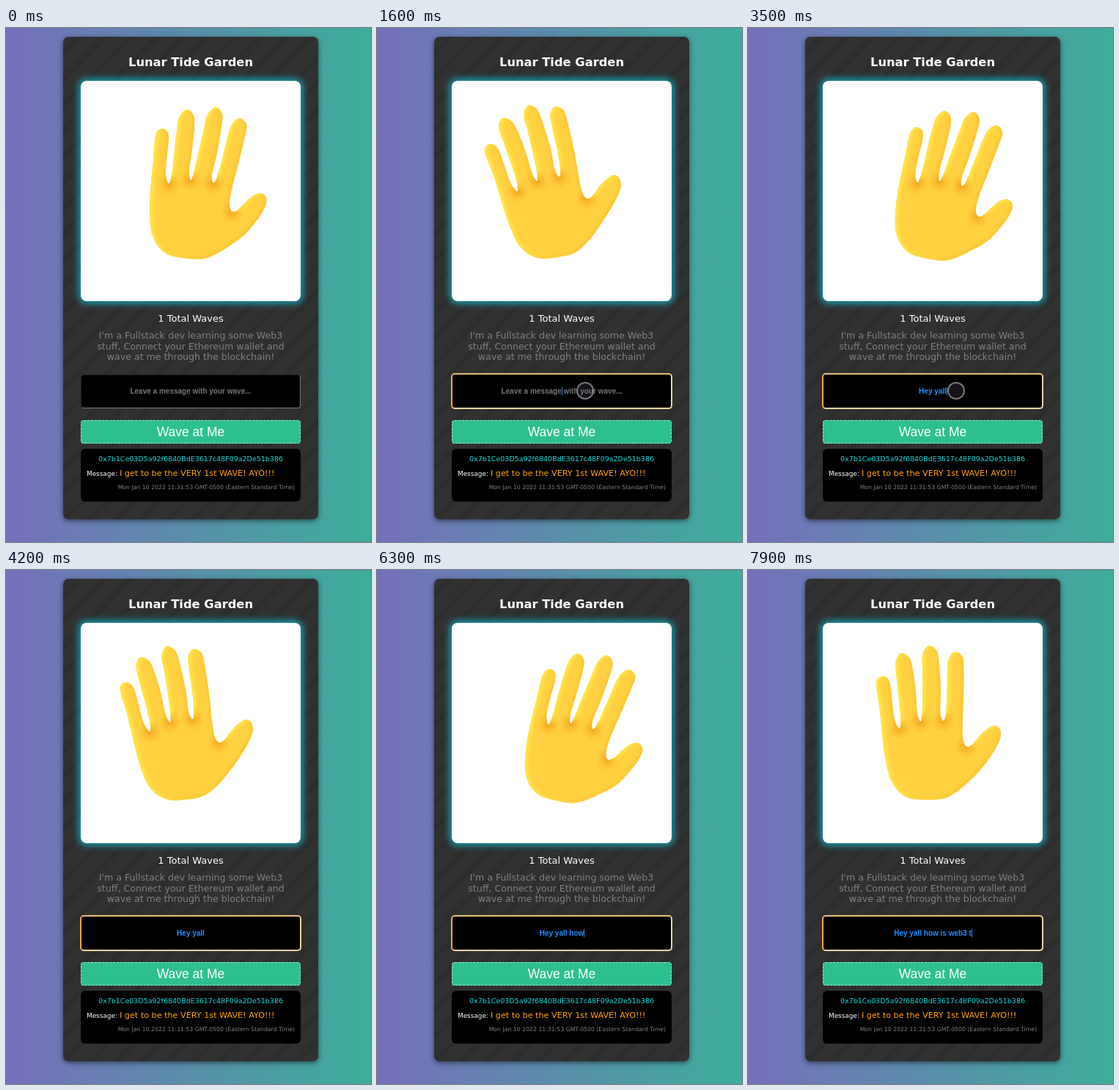
Recreate the animation shown at these times as an HTML page with a canvas. Size 498 by 700 pixels, loop 8 s.

```html
<!DOCTYPE html>
<html lang="en">
<head>
<meta charset="utf-8">
<title>Wave at Me</title>
<style>
html, body { margin: 0; width: 100%; height: 100%; overflow: hidden; }
#stage { position: relative; width: 498px; height: 700px; overflow: hidden; background: linear-gradient(90deg, #766fbb, #3dae9a); }
#stage > * { position: absolute; box-sizing: border-box; }
#card {
  left: 78px; top: 12px; width: 348px; height: 657px; border-radius: 7px;
  background: repeating-linear-gradient(135deg, #313131 0 11px, #2d2d2d 13px 18px, #313131 20px 25px);
  box-shadow: 0 2px 7px rgba(0, 0, 0, .55);
}
#hand { left: 102px; top: 72px; border-radius: 8px; background: #fff; box-shadow: 0 0 10px 3px #16a3b4; }
#field { left: 102px; top: 472px; width: 300px; height: 46px; border: 1px solid; border-color: #1c1c1c #777 #777 #1c1c1c; border-radius: 4px; background: #000; }
#field.focus { left: 101px; top: 470px; width: 302px; height: 49px; border: 2px solid; border-color: #e9bd78 #efd3a2 #efd3a2 #f3a83a; border-radius: 5px; }
#entry { left: 102px; top: 488px; width: 300px; text-align: center; font: bold 10px/14px "Liberation Sans", Arial, sans-serif; white-space: pre; color: #1e90ff; }
#entry.empty { color: #757575; }
#caret { top: 489px; width: 1px; height: 11px; background: #2c7fd0; }
#button {
  left: 102px; top: 534px; width: 300px; height: 32px; border: 1.5px dashed #9fe6d0; border-radius: 4px;
  background: #2ebf91; color: #fff; font: 17.5px/30px "Liberation Sans", Arial, sans-serif; text-align: center;
}
#log { left: 102px; top: 573px; width: 300px; height: 72px; border-radius: 6px; background: #000; }
#pointer { left: -12px; top: -12px; width: 24px; height: 24px; border: 2px solid rgba(150, 150, 155, .75); border-radius: 50%; background: rgba(130, 120, 150, .16); }
svg { left: 0; top: 0; font-family: "DejaVu Sans", sans-serif; }
</style>
</head>
<body>
<div id="stage">
  <div id="card"></div>
  <canvas id="hand" width="300" height="300"></canvas>
  <div id="field"></div>
  <div id="entry"><span id="words"></span></div>
  <div id="caret"></div>
  <div id="button">Wave at Me</div>
  <div id="log"></div>
  <svg width="498" height="700" text-anchor="middle">
    <text x="252" y="52" font-size="16.3" font-weight="bold" fill="#fff">Lunar Tide Garden</text>
    <text x="252" y="400" font-size="13" fill="#fff">1 Total Waves</text>
    <g font-size="12.6" fill="#808080">
      <text x="252" y="423">I'm a Fullstack dev learning some Web3</text>
      <text x="252" y="437.5">stuff, Connect your Ethereum wallet and</text>
      <text x="252" y="452">wave at me through the blockchain!</text>
    </g>
    <text x="252" y="590" font-size="9.5" fill="#0ee0e0">0x7b1Ce03D5a92f6840BdE3617c48F09a2De51b386</text>
    <text x="110" y="610" font-size="8.9" fill="#fff" text-anchor="start">Message:</text>
    <text x="155" y="610" font-size="11.2" fill="#ffa500" text-anchor="start">I get to be the VERY 1st WAVE! AYO!!!</text>
    <text x="394" y="628" font-size="7.75" fill="#808080" text-anchor="end">Mon Jan 10 2022 11:31:53 GMT-0500 (Eastern Standard Time)</text>
  </svg>
  <div id="pointer"></div>
</div>
<script>
const LOOP = 8000, STEP = 100, PERIOD = 2700, FOCUS = 1200;
const HOLD = [2400, 3500];
const PIVOT = [240, 312];

// Hand outline in its neutral pose, clockwise from the lower left.
const outline = [
  [197,268], [196,240], [198,210], [201,180], [203,152], [206,141], [213,137], [220,141], [222,152], [219,180], [218,200],
  [222,212], [226,200], [229,175], [233,140], [237,120], [247,111], [256,119], [257,135], [254,165], [250,195],
  [252,207], [256,198], [262,172], [270,138], [275,118], [286,108], [295,117], [294,135], [288,170], [281,200],
  [283,211], [288,203], [295,178], [303,146], [309,130], [319,123], [328,131], [326,147], [317,185], [308,220], [305,240],
  [308,250], [316,248], [328,236], [338,228], [348,225], [355,231], [354,242], [345,258], [325,282], [300,300], [280,311],
  [264,315], [240,313], [222,309], [208,298], [200,283]
];
const webs = [[222,212], [252,207], [283,211], [308,250]];

// [ms, degrees] over one wave
const swing = [
  [0, 0], [200, 5], [400, 8.5], [600, 9.6], [750, 9.5], [900, 8], [1100, 1], [1300, -9], [1500, -18.4], [1600, -22],
  [1800, -24.6], [2000, -24.7], [2200, -21], [2400, -14], [2500, -10.8], [2600, -7], [2700, 0]
];
const track = [[300, 452, 510], [500, 400, 506], [800, 310, 497], [1000, 284, 494], [3500, 284, 494], [3700, 320, 494], [4000, 450, 494], [4200, 520, 494]];
const typing = [
  [2100, "H"], [2300, "He"], [2400, "Hey"], [3500, "Hey yall"],
  [5100, "Hey yallh"], [5200, "Hey yallho"], [5300, "Hey yallhow"],
  [5500, "Hey yallho"], [5600, "Hey yallh"], [5700, "Hey yall"], [5900, "Hey yall "],
  [6000, "Hey yall h"], [6100, "Hey yall ho"], [6200, "Hey yall how"],
  [6500, "Hey yall how "], [6600, "Hey yall how i"], [6800, "Hey yall how is"], [7000, "Hey yall how is "],
  [7100, "Hey yall how is w"], [7200, "Hey yall how is we"], [7400, "Hey yall how is web"],
  [7500, "Hey yall how is web3"], [7700, "Hey yall how is web3 "], [7900, "Hey yall how is web3 t"]
];

const $ = id => document.getElementById(id);
const field = $("field"), entry = $("entry"), words = $("words"), caret = $("caret"), pointer = $("pointer");
const ctx = $("hand").getContext("2d");
const clamp = v => Math.max(0, Math.min(1, v));

function sample(keys, t) {
  const i = Math.max(1, keys.findIndex(k => k[0] >= t));
  const a = keys[i - 1], b = keys[i];
  const f = clamp((t - a[0]) / (b[0] - a[0]));
  return a.slice(1).map((v, n) => v + (b[n + 1] - v) * f);
}

// Fingertips swing fully, the palm and thumb follow less.
function bend([x, y], degrees) {
  const dx = x - PIVOT[0], dy = PIVOT[1] - y;
  const r = Math.hypot(dx, dy), a = Math.atan2(dx, dy) * 180 / Math.PI;
  const thumb = .22 * clamp((r - 90) / 40) * clamp((a - 35) / 15);
  const k = .65 + .35 * Math.min(1, r / 200) - thumb;
  const turned = (a + degrees * k) * Math.PI / 180;
  return [PIVOT[0] + r * Math.sin(turned), PIVOT[1] - r * Math.cos(turned)];
}

function smooth(pts) {
  const path = new Path2D(), n = pts.length;
  path.moveTo(...pts[0]);
  for (let i = 0; i < n; i++) {
    const [a, b, c, d] = [n - 1, 0, 1, 2].map(o => pts[(i + o) % n]);
    path.bezierCurveTo(
      b[0] + (c[0] - a[0]) / 6, b[1] + (c[1] - a[1]) / 6,
      c[0] - (d[0] - b[0]) / 6, c[1] - (d[1] - b[1]) / 6, ...c);
  }
  path.closePath();
  return path;
}

function rim(path, dx, dy, color, blur) {
  const edge = new Path2D();
  edge.rect(60, 40, 400, 400);
  edge.addPath(path, new DOMMatrix([1, 0, 0, 1, dx, dy]));
  ctx.filter = `blur(${blur}px)`;
  ctx.fillStyle = color;
  ctx.fill(edge, "evenodd");
  ctx.filter = "none";
}

function drawHand(degrees) {
  const path = smooth(outline.map(p => bend(p, degrees)));
  ctx.clearRect(0, 0, 300, 300);
  ctx.save();
  ctx.translate(-102, -72);
  ctx.fillStyle = "#ffd141";
  ctx.fill(path);
  ctx.clip(path);
  rim(path, -2, -2, "rgba(250, 180, 40, .5)", 2.5);
  rim(path, 4, 0, "rgba(255, 236, 72, .85)", 2.5);
  for (const web of webs) {
    const [x, y] = bend(web, degrees);
    const glow = ctx.createRadialGradient(x, y, 0, x, y, 17);
    glow.addColorStop(0, "rgba(240, 150, 20, .75)");
    glow.addColorStop(1, "rgba(250, 180, 40, 0)");
    ctx.fillStyle = glow;
    ctx.fillRect(x - 17, y - 17, 34, 34);
  }
  ctx.restore();
}

function render(time) {
  let t = Math.floor(time / STEP) * STEP;
  if (t >= HOLD[0] && t < HOLD[1]) t = HOLD[0];

  const skip = t >= HOLD[1] ? 150 * clamp(1 - (t - HOLD[1]) / 600) : 0;
  drawHand(sample(swing, (t + skip) % PERIOD)[0]);

  const typed = typing.filter(k => k[0] <= t).pop();
  words.textContent = typed ? typed[1] : "Leave a message with your wave...";
  entry.className = typed ? "" : "empty";
  field.className = t >= FOCUS ? "focus" : "";

  const since = t - (typed ? typed[0] : FOCUS);
  const half = typed ? words.getBoundingClientRect().width / 2 : 0;
  caret.style.left = Math.round(252 + half) + "px";
  caret.style.visibility = since >= 0 && since % 1000 < 500 ? "visible" : "hidden";

  const shown = t >= track[0][0] && t < track[track.length - 1][0];
  pointer.style.visibility = shown ? "visible" : "hidden";
  if (shown) {
    const [x, y] = sample(track, t);
    pointer.style.transform = `translate(${x}px, ${y}px)`;
  }
}

const start = performance.now();
function tick() {
  render((performance.now() - start) % LOOP);
  requestAnimationFrame(tick);
}
tick();
</script>
</body>
</html>
```
